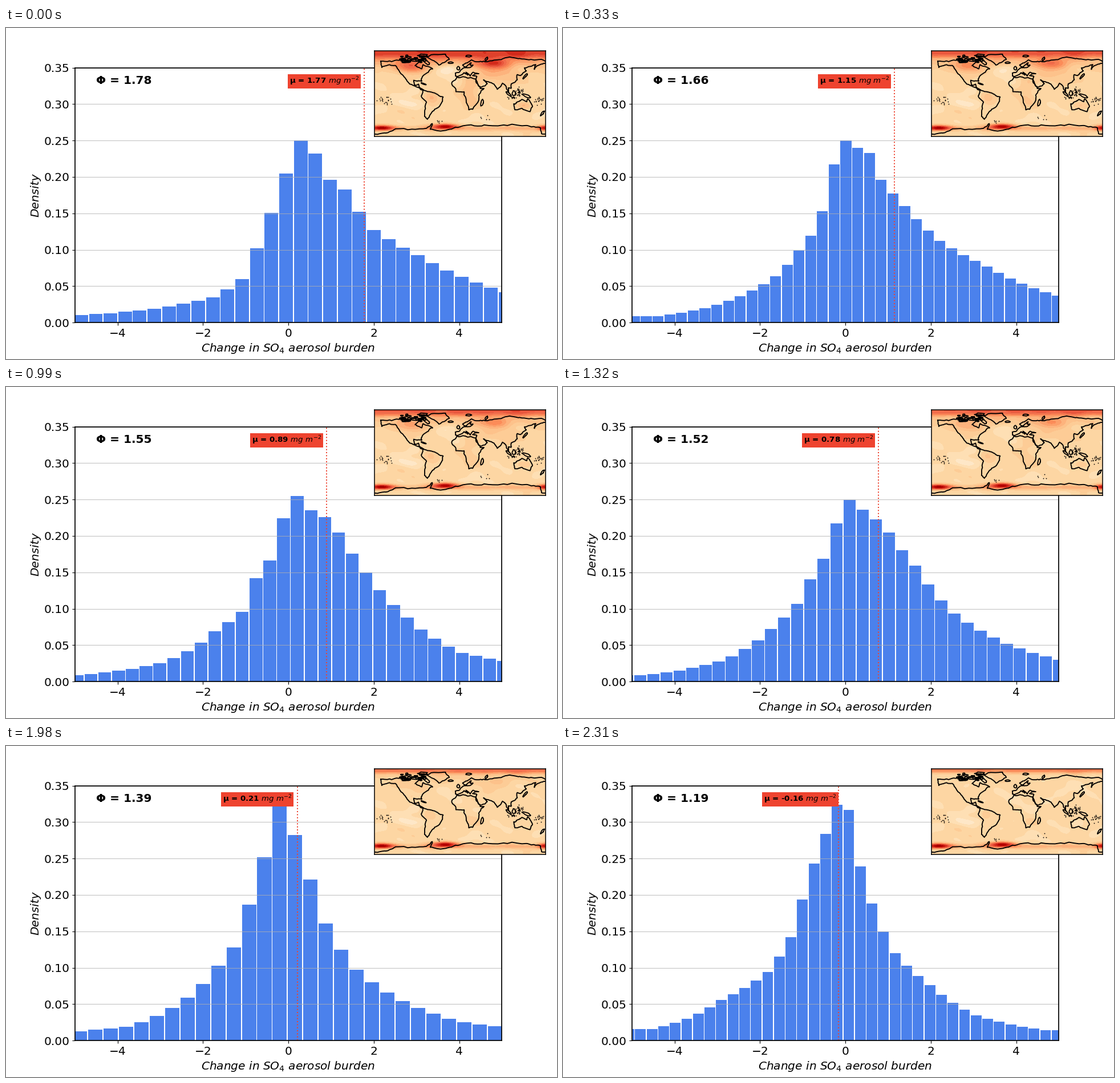
Animation of 966x580 px, one loop 2.64 s. Source, as a matplotlib script:

```python
import numpy as np
import matplotlib.pyplot as plt
from matplotlib.animation import FuncAnimation

W, H, DPI = 966, 580, 100
K = 0.966                      # point scale
BLUE, RED = "#4b81ec", "#ee432f"

plt.rcParams.update({"font.family": "DejaVu Sans", "font.size": 15 * K,
                     "mathtext.fontset": "dejavusans"})


def state(phi, mu, peak, width, *heights):
    """Peak position, bin width and heights (in thousandths) at the knots."""
    return np.array([phi, mu, peak, width, *heights])


# knots count bins from the tallest one
knots = [-16, -10, -6, -4, -3, -2, -1, 0, 1, 2, 3, 5, 8, 12, 18]
a = state(1.78, 1.77, .288, .3427, 9, 19, 35, 60, 102, 151, 205, 250, 232, 196, 183, 127, 93, 55, 24)
b = state(1.66, 1.15, .013, .2750, 9, 30, 64, 99, 119, 153, 217, 250, 240, 233, 196, 160, 112, 77, 37)
c = state(1.55, .89, .208, .3219, 9, 25, 69, 96, 142, 166, 224, 255, 235, 226, 205, 150, 88, 39, 21)
d = state(1.48, .66, -.01, .2911, 8, 30, 75, 118, 139, 172, 211, 244, 237, 219, 205, 168, 99, 65, 25)
e = state(1.39, .21, -.202, .36, 9, 19, 59, 103, 128, 187, 252, 322, 282, 221, 161, 97, 54, 25, 13)
f = state(1.19, -.16, -.191, .271, 16, 56, 94, 142, 194, 243, 284, 324, 317, 239, 188, 120, 76, 35, 14)
states = [a, b, (b + c) / 2, c, (c + d) / 2, d, e, f]

fig = plt.figure(figsize=(W / DPI, H / DPI), dpi=DPI, facecolor="white")
ax = fig.add_axes([.125, .11, .775, .77])
ax.set(xlim=(-5, 5), ylim=(0, .35), xticks=range(-4, 5, 2))
ax.tick_params(length=3.5 * K, pad=3.5 * K, width=.8)
ax.grid(axis="y", lw=.8, alpha=.75)
ax.set_xlabel("Change in $SO_4$ aerosol burden", style="italic", labelpad=4 * K)
ax.set_ylabel("Density", style="italic", labelpad=4 * K)
ax.spines[:].set_linewidth(1.25)

phi_text = ax.text(-4.5, .328, "", weight="bold")
mean_line = ax.axvline(0, color=RED, ls=":", lw=1.5 * K)
mu_text = ax.text(0, .328, "", weight="bold", size=10 * K,
                  bbox=dict(facecolor=RED, edgecolor="none", pad=2))

# inset world map
inset = fig.add_axes([645.5 / W, 1 - 190 / H, 300 / W, 150 / H])
inset.set(xlim=(-180, 180), ylim=(-90, 90), xticks=[], yticks=[])
inset.spines[:].set_linewidth(1.1)
inset.spines[:].set_zorder(5)
rng = np.random.default_rng(4)


def coast(*p):
    """Polyline through lon/lat pairs, roughened by midpoint displacement."""
    p = np.reshape(p, (-1, 2)).astype(float)
    for _ in range(3):
        seg = np.diff(p, axis=0)
        mid = p[:-1] + seg / 2
        size = np.minimum(np.hypot(*seg.T), 15)[:, None]
        mid += rng.normal(0, .07, mid.shape) * size
        p = np.insert(p, range(1, len(p)), mid, axis=0)
    inset.plot(*p.T, color="black", lw=1.35, zorder=3)


def isle(lon, lat, rx, ry, tilt=0):
    t = np.linspace(0, 2 * np.pi, 11)
    r = rng.uniform(.7, 1.15, 11)
    r[-1] = r[0]
    z = (rx * r * np.cos(t) + 1j * ry * r * np.sin(t)) * np.exp(1j * np.radians(tilt))
    inset.plot(lon + z.real, lat + z.imag, color="black", lw=1.3, zorder=3)


# Americas
coast(-166, 68, -128, 70, -95, 68, -82, 68, -94, 59, -80, 52, -77, 61, -57, 52,
      -66, 45, -81, 31, -80, 26, -97, 28, -95, 18, -87, 20, -83, 9, -77, 8,
      -105, 20, -113, 30, -124, 42, -135, 59, -151, 60, -164, 55, -166, 68)
coast(-77, 8, -50, 0, -35, -7, -40, -22, -57, -37, -68, -54, -74, -48, -70, -18,
      -81, -5, -77, 8)
# Eurasia
coast(-9, 43, -1, 45, 8, 54, 22, 55, 28, 60, 22, 60, 24, 65, 14, 56, 6, 60, 25, 71,
      41, 67, 68, 69, 105, 77, 140, 72, 180, 68)
coast(180, 64, 162, 58, 157, 51, 160, 61, 136, 54, 140, 48, 128, 38, 121, 40, 121, 29,
      108, 20, 108, 11, 102, 12, 103, 2, 97, 16, 90, 22, 79, 9, 72, 20, 50, 29,
      58, 21, 44, 13, 34, 30)
coast(34, 30, 36, 36, 27, 38, 40, 42, 28, 45, 22, 37, 13, 45, 17, 39, 9, 44, -5, 36,
      -9, 37, -9, 43)
# Africa, Greenland, Australia, Antarctica
coast(34, 30, 11, 35, -6, 35, -17, 21, -8, 4, 9, 4, 13, -10, 19, -34, 27, -33,
      35, -22, 40, -14, 40, -3, 51, 11, 43, 11, 34, 29)
coast(-72, 78, -30, 83, -22, 72, -44, 60, -54, 69, -72, 78)
coast(114, -22, 131, -12, 141, -17, 143, -11, 153, -27, 148, -38, 131, -31,
      116, -34, 114, -22)
coast(-180, -85, -155, -83, -135, -74, -70, -73, -58, -63, -62, -75, -35, -78,
      0, -70, 60, -67, 140, -67, 170, -72, 172, -84, 180, -85)

isle(47, -19, 2.5, 7, -15)
isle(138, 37, 2, 7, -40)
isle(-3, 54, 3, 4)
isle(-19, 65, 5, 2)
isle(102, 0, 2, 8, 48)
isle(114, 1, 4, 5)
isle(141, -5, 10, 3, -20)
isle(174, -41, 2, 7, -40)
isle(56, 73, 2, 5, -35)
isle(-77, 21, 6, 1, -20)
isle(18, 79, 6, 2)

# crowded Arctic archipelago
isle(-72, 68, 10, 4, -40)
isle(-78, 80, 11, 3)
for lon, lat in rng.uniform((-124, 66), (-72, 81), (26, 2)):
    isle(lon, lat, *rng.uniform((2, .7), (6, 2)))


def specks(lon, lat, sx, sy, n):
    inset.scatter(rng.normal(lon, sx, n), rng.normal(lat, sy, n), s=1.6,
                  c="black", lw=0, zorder=3)


specks(-158, -15, 12, 5, 22)
specks(166, -14, 5, 4, 20)
specks(124, 3, 4, 6, 40)
specks(112, -8, 6, 1, 16)
specks(52, -50, 9, 4, 5)
specks(-45, -57, 8, 2, 5)

lon, lat = np.meshgrid(np.linspace(-180, 180, 181), np.linspace(-90, 90, 121))
ripple = sum(.01 * np.sin(k * np.radians(lon) + (-1) ** k * (k + 3) * np.radians(lat)
                          + rng.uniform(0, 6)) for k in range(1, 7))


def spot(x, y, rx, ry, amp):
    return amp * np.exp(-((lon - x) / rx) ** 2 - ((lat - y) / ry) ** 2)


def step(edge, soft):
    return 1 / (1 + np.exp((edge - lat) / soft))


fixed = (.225 + ripple + spot(-105, -22, 30, 9, -.09) + spot(-65, -8, 12, 12, .07)
         + spot(-30, -69, 27, 5, .58) + spot(-163, -72, 24, 5, .55)
         + spot(180, -72, 13, 5, .45) + spot(0, -73, 400, 5, .17))
warming = (spot(-103, 56, 30, 13, .32) + spot(68, 64, 32, 11, .34)
           + spot(85, 42, 55, 18, .17) + spot(20, 5, 20, 30, .15)
           + spot(-56, -10, 14, 15, .11) + spot(134, -25, 16, 8, .17)
           + spot(-22, 54, 24, 12, -.18) + .22 * step(58, 5))
levels = np.linspace(0, 1, 20)
offsets = np.arange(-20, 21)
drawn = []


def update(i):
    while drawn:
        drawn.pop().remove()
    phi, mu, peak, width, *heights = states[i]
    density = np.exp(np.interp(offsets, knots, np.log(heights))) / 1000
    drawn.append(ax.bar(peak + width * offsets, density, width * .93, color=BLUE))
    ax.set(xlim=(-5, 5), ylim=(0, .35))
    phi_text.set_text(f"Φ = {phi:.2f}")
    mu_text.set_text(f"μ = {mu:.2f} $mg\\ m^{{-2}}$")
    mu_text.set_x(mu - 1.75)
    mean_line.set_xdata([mu, mu])
    w = (mu + .16) / 1.93
    field = fixed + w * warming + (.36 - .08 * w) * step(83 - 7 * w, 2.5)
    drawn.append(inset.contourf(lon, lat, np.clip(field, .001, .999), levels,
                                cmap="OrRd", vmin=0, vmax=1, zorder=1))


anim = FuncAnimation(fig, update, frames=len(states), interval=330,
                     init_func=lambda: None, repeat=True, repeat_delay=0)
plt.show()
```
